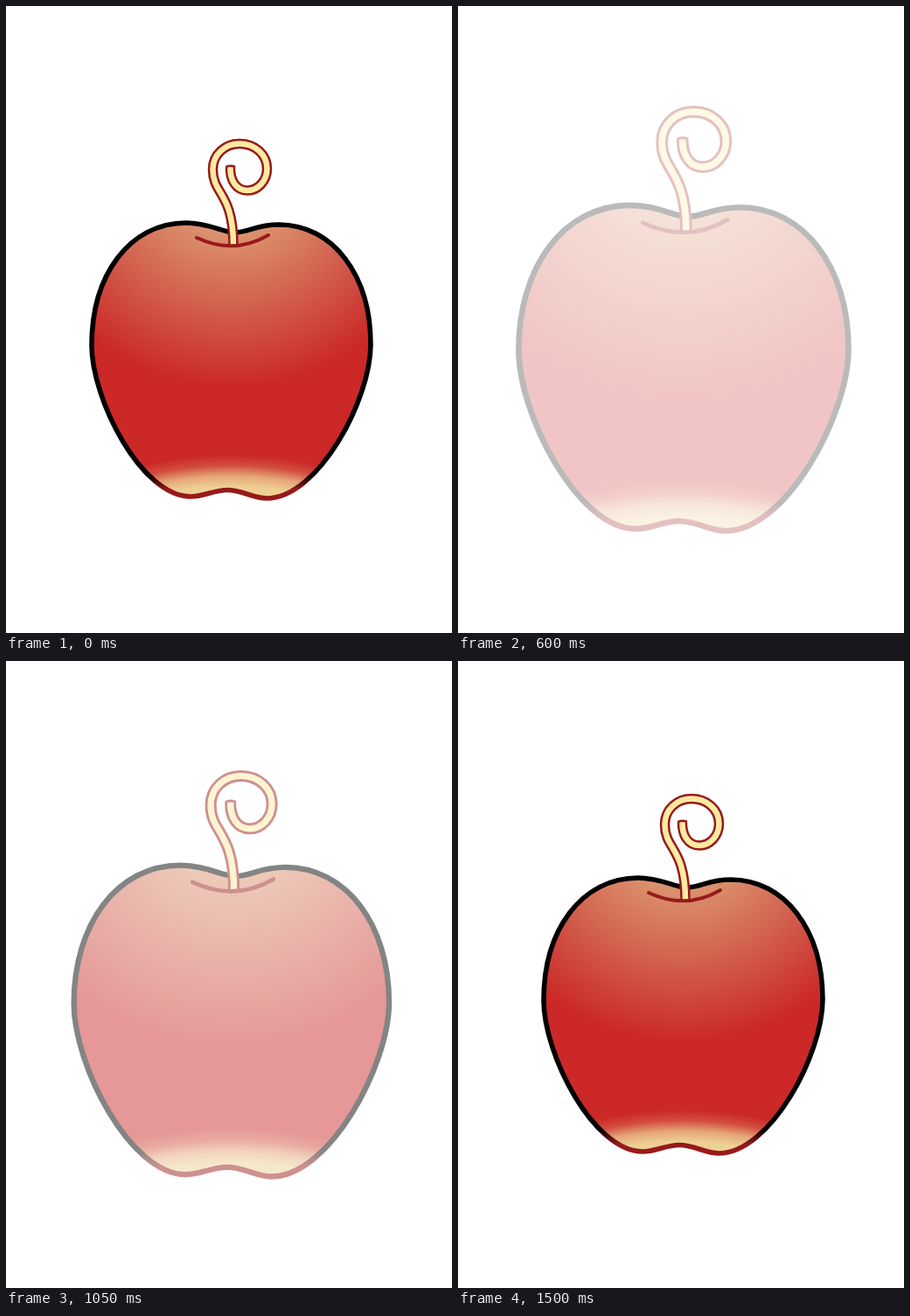
Write an HTML page with a canvas that moves like this. It is 510 px wide and 717 px high and loops after 1.55 s.

```html
<!DOCTYPE html>
<html lang="en">
<head>
<meta charset="utf-8">
<title>Pulsing apple</title>
<style>
html, body { margin: 0; width: 100%; height: 100%; overflow: hidden; background: #fff; }
canvas { display: block; width: 510px; height: 717px; }
</style>
</head>
<body>
<canvas id="stage" width="510" height="717"></canvas>
<script>
const W = 510, H = 717, LOOP = 1550, STEP = 50, HALF = 750;
const ctx = document.getElementById('stage').getContext('2d');
const RED = '#cb2827', DARK_RED = '#981a1a', CREAM = '#ffeaa2';

// Each curve joins two extreme points of the apple.
const body = new Path2D(`M206 248
  C141 248 98 308 98 388
  C98 450 155 561 211 561
  C226 561 238 553.5 253 553.5
  C270 553.5 283 563 298 563
  C357 563 417 450 417 387
  C417 308 374 250 312 250
  C286 250 277 259 261 259
  C248 259 232 248 206 248Z`);

// The stem rises, then winds into a narrowing curl.
const stem = new Path2D(`M260 274
  C260 213 236.5 216 236.5 187
  C236.5 170 250 157.5 267 157.5
  C285 157.5 298.5 170 298.5 186
  C298.5 200 288 211 276 211
  C263 211 256 199 256.5 184`);
const stemTip = new Path2D('M252.5 183.5 Q257 182 261 183.5');
const mouth = new Path2D('M218 265 Q261 285 300 262');

function ramp(gradient, ...colors) {
  colors.forEach((color, i) => gradient.addColorStop(i / (colors.length - 1), color));
  return gradient;
}

const cream = alpha => `rgba(238,208,148,${alpha})`;
const shine = ramp(ctx.createRadialGradient(257, 183, 70, 257, 183, 253),
  '#dc9670', '#d2604e', RED);
const base = ramp(ctx.createRadialGradient(257, 950, 437, 257, 950, 400),
  cream(0), cream(0.22), cream(0.75), cream(1));
const rim = ramp(ctx.createLinearGradient(0, 536, 0, 553), '#000', DARK_RED);

function fill(path, color) {
  ctx.fillStyle = color;
  ctx.fill(path);
}

function line(path, color, width, cap = 'butt') {
  ctx.strokeStyle = color;
  ctx.lineWidth = width;
  ctx.lineCap = cap;
  ctx.stroke(path);
}

function drawApple() {
  fill(body, shine);
  fill(body, base);
  line(body, rim, 5.6);
  line(stem, DARK_RED, 11.5);
  line(stem, CREAM, 6.5);
  line(stemTip, DARK_RED, 2.5, 'round');
  line(mouth, DARK_RED, 4, 'round');
}

// Slow start, quick middle, long settling towards the peak.
function ease(x) {
  const rise = 12 * x ** 4.65;
  return rise / (rise + (1 - x) ** 0.55);
}

function cover(color) {
  ctx.setTransform(1, 0, 0, 1, 0, 0);
  ctx.fillStyle = color;
  ctx.fillRect(0, 0, W, H);
}

function render(time) {
  const t = Math.floor((time % LOOP) / STEP) * STEP;
  const pulse = ease(1 - Math.abs(t - HALF) / HALF);
  const scale = 1 + 0.2 * pulse;

  cover('#fff');
  ctx.translate(W / 2, H / 2);
  ctx.scale(scale, scale);
  ctx.translate(-W / 2, -H / 2);
  drawApple();
  // Fade the whole apple as one layer into the white stage.
  cover(`rgba(255,255,255,${0.8 * pulse})`);
}

const start = performance.now();
function tick() {
  render(performance.now() - start);
  requestAnimationFrame(tick);
}
tick();
</script>
</body>
</html>
```
